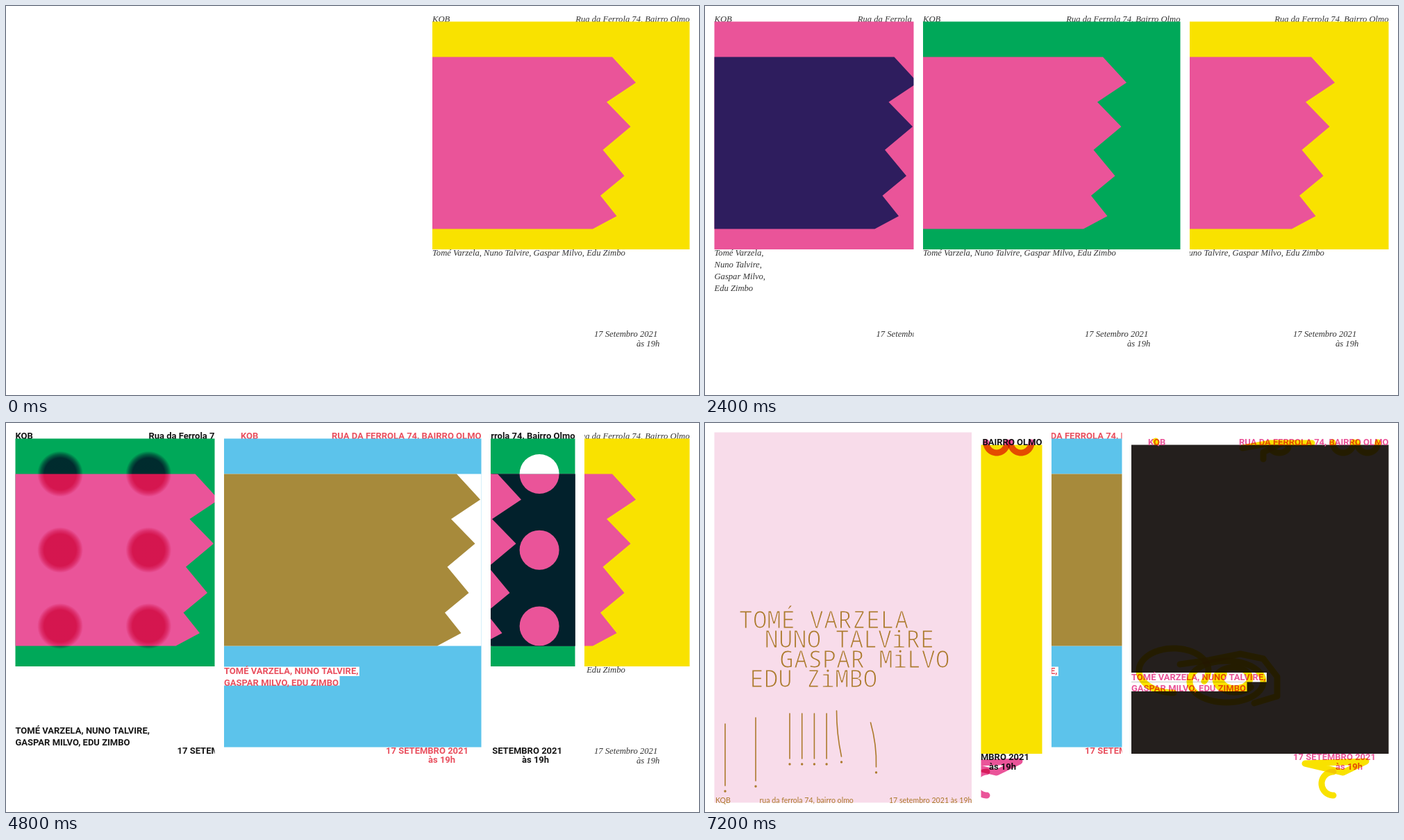
Animation of 998 by 561 pixels, one loop 8 s. Source, as an HTML page with a canvas:

```html
<!DOCTYPE html>
<html lang="pt">
<head>
<meta charset="utf-8">
<title>Cartazes</title>
<style>
html, body { margin: 0; width: 100%; height: 100%; overflow: hidden; background: #fff; }
canvas { display: block; }
</style>
</head>
<body>
<canvas id="stage" width="998" height="561"></canvas>
<script>
const ctx = document.getElementById('stage').getContext('2d');

const STEP = 800, WIDTH = 370.5, MARGIN = 13.5;
const TOP = 22.5, BAND_TOP = 73.5, BAND_BOTTOM = 321.5, BOTTOM = 351;
const PINK = '#ea5499', YELLOW = '#f9e200', GREEN = '#00a859', NAVY = '#2e1d5e';
const BLUE = '#5cc3eb', BROWN = '#a78a3b', DARK = '#02212c', BLACK = '#241f1d';
const RED = '#e9505f', INK = '#161616', GOLD = '#ac7a2c', PALE = '#f8dcea';

const SERIF = 'italic 12.6px "Liberation Serif", serif';
const SANS = 'bold 13px Roboto, sans-serif';
const SMALL = '10.6px Lato, sans-serif';
const MONO = '34px "Noto Sans Mono", monospace';

const VENUE = 'KQB';
const ADDRESS = 'Rua da Ferrola 74, Bairro Olmo';
const PLAYERS = ['Tomé Varzela', 'Nuno Talvire', 'Gaspar Milvo', 'Edu Zimbo'];
const DATE = '17 Setembro 2021', HOUR = 'às 19h';
const ONE_LINE = [PLAYERS.join(', ')];
const FOUR_LINES = PLAYERS.map((name, i) => name + (i < 3 ? ',' : ''));
const TWO_LINES = [`${PLAYERS[0]}, ${PLAYERS[1]},`, `${PLAYERS[2]}, ${PLAYERS[3]}`]
  .map(line => line.toUpperCase());

const TEETH = [[259, BAND_TOP], [293, 110.5], [251, 138.5], [285.5, 174], [245.5, 207.5],
  [276.5, 245], [242, 273.5], [265.5, 303], [231, BAND_BOTTOM]];

function text(string, x, y, color, font, align = 'left') {
  ctx.font = font;
  ctx.fillStyle = color;
  ctx.textAlign = align;
  ctx.fillText(string, x, y);
}

function rect(x, y, w, h, color) {
  ctx.fillStyle = color;
  ctx.fillRect(x, y, w, h);
}

function circle(x, y, r, color) {
  ctx.fillStyle = color;
  ctx.beginPath();
  ctx.arc(x, y, r, 0, 2 * Math.PI);
  ctx.fill();
}

function clipped(y, bottom, draw) {
  ctx.save();
  ctx.beginPath();
  ctx.rect(0, y, WIDTH, bottom - y);
  ctx.clip();
  draw();
  ctx.restore();
}

// A band from the left edge to a row of teeth
function toothed(color, shift = 0) {
  ctx.fillStyle = color;
  ctx.beginPath();
  ctx.moveTo(0, BAND_TOP);
  TEETH.forEach(([x, y]) => ctx.lineTo(x + shift, y));
  ctx.lineTo(0, BAND_BOTTOM);
  ctx.fill();
}

function halfTurn(draw) {
  ctx.save();
  ctx.translate(WIDTH, BAND_TOP + BAND_BOTTOM);
  ctx.rotate(Math.PI);
  draw();
  ctx.restore();
}

// Spots sit on a grid of three by three
const spotX = column => 64.5 + 127.3 * column;
const spotY = row => 73.5 + 109.7 * row;

function heading(address, color, font, venueX = 0, y = 22.5) {
  text(VENUE, venueX, y, color, font);
  text(address, WIDTH, y, color, font, 'right');
}

function when(color, font, y = 477) {
  text(font === SANS ? DATE.toUpperCase() : DATE, 233, y, color, font);
  text(HOUR, 294, y + 13.7, color, font);
}

function lines(list, y, pitch, color, font) {
  list.forEach((line, i) => text(line, 0, y + i * pitch, color, font));
}

function labels(y, color) {
  ctx.font = SANS;
  TWO_LINES.forEach((line, i) =>
    rect(0, y - 10.5 + i * 13.5, ctx.measureText(line).width + 1.5, 13.5, '#fff'));
  lines(TWO_LINES, y, 16.5, color, SANS);
}

function serifPoster(ground, figure, names = ONE_LINE) {
  heading(ADDRESS, '#333', SERIF);
  lines(names, 360, 17, '#333', SERIF);
  rect(0, TOP, WIDTH, BOTTOM - TOP, ground);
  toothed(figure);
  when('#333', SERIF);
}

function sansBase() {
  heading(ADDRESS, INK, SANS);
  lines(TWO_LINES, 447.5, 17, INK, SANS);
  when(INK, SANS, 476.5);
  rect(0, TOP, WIDTH, BOTTOM - TOP, GREEN);
}

function cutoutPoster() {
  sansBase();
  rect(0, BAND_TOP, WIDTH, BAND_BOTTOM - BAND_TOP, DARK);
  toothed(PINK);
  // The same teeth upside down, cut out from the left
  clipped(BAND_TOP, BAND_BOTTOM, () => {
    rect(0, BAND_TOP, 145, BAND_BOTTOM - BAND_TOP, '#fff');
    halfTurn(() => toothed(PINK));
    rect(251, BAND_TOP, WIDTH, BAND_BOTTOM, DARK);
    toothedFace();
    for (let row = 0; row < 3; row++) circle(spotX(2), spotY(row), 28.5, PINK);
  });
  clipped(TOP, BAND_TOP, () => {
    for (let column = 0; column < 3; column++) circle(spotX(column), spotY(0), 28.5, '#fff');
  });
}

// Pink between the upside-down teeth and the upright ones
function toothedFace() {
  rect(140, BAND_TOP, 111, BAND_BOTTOM - BAND_TOP, PINK);
  clipped(BAND_TOP, BAND_BOTTOM, () => {
    ctx.beginPath();
    ctx.rect(140, BAND_TOP, WIDTH, BAND_BOTTOM);
    ctx.clip();
    rect(140, BAND_TOP, WIDTH, BAND_BOTTOM, DARK);
    toothed(PINK);
  });
}

function spottedPoster() {
  sansBase();
  toothed(PINK);
  ctx.globalCompositeOperation = 'multiply';
  for (let i = 0; i < 9; i++) {
    const x = spotX(i % 3), y = spotY(Math.floor(i / 3));
    const blur = ctx.createRadialGradient(x, y, 23, x, y, 33);
    blur.addColorStop(0, 'rgba(232,66,132,1)');
    blur.addColorStop(0.5, 'rgba(232,66,132,.6)');
    blur.addColorStop(1, 'rgba(232,66,132,0)');
    circle(x, y, 33, blur);
  }
  ctx.globalCompositeOperation = 'source-over';
}

function bluePoster() {
  heading(ADDRESS.toUpperCase(), RED, SANS, 24);
  rect(0, TOP, WIDTH, 445, BLUE);
  rect(0, BAND_TOP, WIDTH, BAND_BOTTOM - BAND_TOP, '#fff');
  toothed(BROWN, 76);
  labels(362, RED);
  when(RED, SANS, 476.5);
}

// Part of an ellipse, in turns; the radius falls by `shrink` along the way
function coil(cx, cy, rx, ry, from, to, shrink = 0) {
  ctx.beginPath();
  for (let i = 0; i <= 60; i++) {
    const k = i / 60, angle = 2 * Math.PI * (from + (to - from) * k), size = 1 - shrink * k;
    ctx.lineTo(cx + rx * size * Math.cos(angle), cy + ry * size * Math.sin(angle));
  }
  ctx.stroke();
}

function stroke(...points) {
  ctx.beginPath();
  points.forEach(([x, y]) => ctx.lineTo(x, y));
  ctx.stroke();
}

function scribbles(color) {
  ctx.strokeStyle = color;
  ctx.lineWidth = 9;
  ctx.lineCap = ctx.lineJoin = 'round';
  stroke([35, 26], [36, 28]);
  stroke([160, 36], [200, 29], [260, 29]);
  stroke([215, 30], [190, 42], [190, 52]);
  coil(213, 34, 13, 9, 0.5, 0);
  coil(305, 28, 15, 15, 0.5, 0);
  coil(340, 28, 15, 15, 0.5, 0);

  coil(61, 357, 50, 32, 0.25, 1.08);
  stroke([70, 348], [112, 342], [157, 333], [190, 340], [210, 366], [210, 394], [177, 404]);
  coil(137, 373, 53, 30, 0, 1);
  coil(148, 369, 30, 20, 0.1, 1.6, 0.4);

  stroke([250, 491], [338, 488], [305, 504], [250, 491]);
  coil(291, 520, 17, 17, 0.75, 0.25);
}

function scribbledPoster(ground, ink, marker) {
  rect(0, 31.5, WIDTH, 445.5, ground);
  heading(ADDRESS.toUpperCase(), ink, SANS, 24, 32);
  labels(370.5, ink);
  when(ink, SANS, 486);
  ctx.globalCompositeOperation = 'multiply';
  scribbles(marker);
  ctx.globalCompositeOperation = 'source-over';
}

function exclamation(x, top, bottom, lean = 0, bend = 0) {
  ctx.beginPath();
  ctx.moveTo(x, top);
  ctx.quadraticCurveTo(x + bend, (top + bottom) / 2, x + lean, bottom);
  ctx.stroke();
  circle(x + lean, bottom + 8, 1.7, GOLD);
}

function thinText(string, x, y) {
  text(string, x, y, GOLD, MONO);
  ctx.strokeStyle = PALE;
  ctx.lineWidth = 1.2;
  ctx.strokeText(string, x, y);
}

function palePoster() {
  rect(0, 13.5, WIDTH, 534, PALE);
  const starts = [35, 72, 94, 51];
  PLAYERS.forEach((name, i) =>
    thinText(name.toUpperCase().replace('I', 'i'), starts[i], 296 + i * 28.4));
  ctx.strokeStyle = GOLD;
  ctx.lineWidth = 1.6;
  ctx.lineCap = 'round';
  exclamation(15.5, 434, 523);
  exclamation(59.5, 425, 516);
  for (let i = 0; i < 4; i++) exclamation(108.5 + 17.7 * i, 419, 484);
  exclamation(176, 415, 481, 7, 0);
  exclamation(225, 432, 496, 8, 9);
  text(VENUE, 1.5, 547.5, GOLD, SMALL);
  text(ADDRESS.toLowerCase(), 65, 547.5, GOLD, SMALL);
  text(`${DATE} ${HOUR}`.toLowerCase(), WIDTH + 0.5, 547.5, GOLD, SMALL, 'right');
}

const posters = [
  [614, () => serifPoster(YELLOW, PINK)],
  [178.5, () => serifPoster(GREEN, PINK)],
  [13.5, () => serifPoster(PINK, NAVY, FOUR_LINES)],
  [314, () => serifPoster(GREEN, PINK)],
  [449, cutoutPoster],
  [13.5, spottedPoster],
  [314, bluePoster],
  [115, () => scribbledPoster(YELLOW, INK, PINK)],
  [614, () => scribbledPoster(BLACK, PINK, YELLOW)],
  [13.5, palePoster]
];

function frame() {
  const step = Math.floor(performance.now() / STEP) % posters.length;
  rect(0, 0, 998, 561, '#fff');
  for (const [x, draw] of posters.slice(0, step + 1)) {
    ctx.save();
    ctx.translate(x, 0);
    rect(-MARGIN, 0, WIDTH + 2 * MARGIN, 561, '#fff');
    draw();
    ctx.restore();
  }
  requestAnimationFrame(frame);
}
frame();
</script>
</body>
</html>
```
